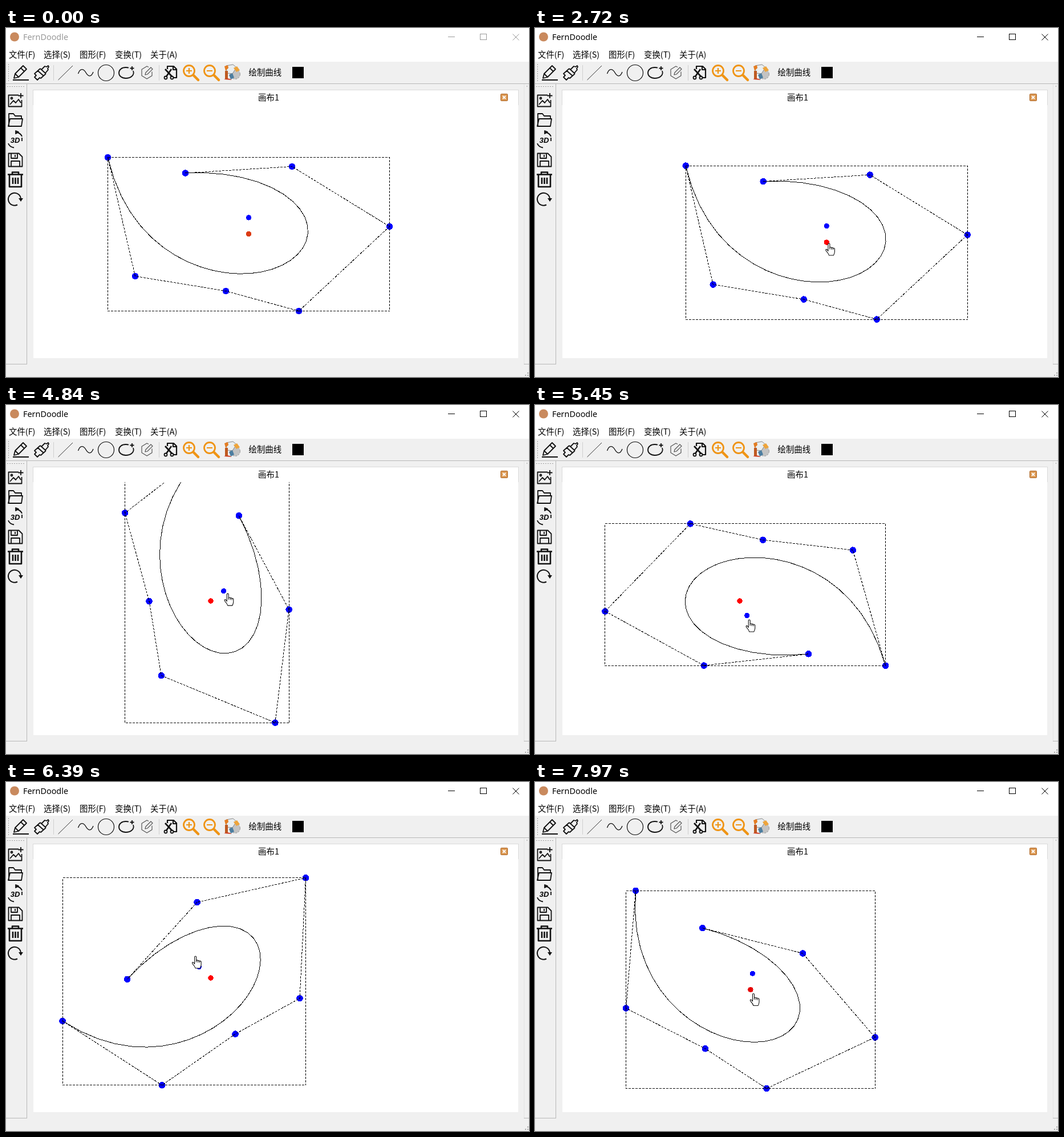
Recreate the animation shown at these times as an HTML page. Size 917 by 611 pixels, loop 8 s.

```html
<!DOCTYPE html>
<html lang="zh">
<head>
<meta charset="utf-8">
<title>FernDoodle</title>
<style>
html, body { margin: 0; width: 100%; height: 100%; overflow: hidden; background: #f0f0f0; }
svg { display: block; width: 917px; height: 611px; }
text { font: 14.4px "Noto Sans CJK SC", "Noto Sans CJK", "Noto Sans", sans-serif; }
.ico { fill: none; stroke: #111; stroke-width: 1.8; stroke-linejoin: round; }
.crisp { shape-rendering: crispEdges; }
.dash { fill: none; stroke: #000; stroke-dasharray: 4 2; }
</style>
</head>
<body>
<svg viewBox="0 0 917 611">
  <defs><clipPath id="page"><rect x="48" y="135" width="850" height="443"/></clipPath></defs>

  <!-- window frame -->
  <rect width="917" height="611" fill="#f0f0f0"/>
  <rect width="917" height="59" fill="#fff"/>
  <circle cx="15" cy="15.5" r="8" fill="#c98a5e"/>
  <text id="title" x="30" y="21" style="font-family:'Noto Sans',sans-serif">FernDoodle</text>
  <g id="buttons" class="crisp" fill="none">
    <path d="M775 15.5h12M831.5 10.5h11v10h-11z"/>
    <path d="M888.5 10.5l11 11M899.5 10.5l-11 11" shape-rendering="auto"/>
  </g>
  <g id="menu">
    <text x="5" y="52">文件(F)</text><text x="66" y="52">选择(S)</text><text x="129" y="52">图形(F)</text>
    <text x="191" y="52">变换(T)</text><text x="253" y="52">关于(A)</text>
  </g>
  <g class="crisp" fill="none" stroke="#b8b8b8">
    <path d="M0 97.5H917M36.5 98V588M0 588.5H37M908 588.5H917"/>
    <path d="M908.5 98V588" stroke="#e4e4e4"/>
    <path d="M83.5 65V92M268.5 65V92" stroke="#cfcfcf"/>
    <path d="M4.5 63V94M2 102.5H34M913.5 101V104" stroke="#a0a0a0" stroke-dasharray="2 2"/>
    <path d="M914 603.5h2M910 607.5h2M914 607.5h2" stroke="#a8a8a8" stroke-width="2"/>
  </g>

  <!-- top tools -->
  <g class="ico">
    <path d="M12 91H40M14 88l2-8L30 66l6 6L22 86zM26 70l6 6M16 80l6 6"/>
    <path d="M60 71l10 9M62 73l6-6 3 1 3-2 1 2-2 3 1 2-5 6M60 71l-10 9 3 3-3 3 5 5 4-4 2 1 9-8M56 75l10 9"/>
    <path d="M91.5 91L117 66" stroke="#333" stroke-width="1"/>
    <path d="M126.5 80C130 70 136 71 140 78S149 87 153 77" stroke-width="1.4"/>
    <circle cx="175.5" cy="78.5" r="14" stroke-width="1.2"/>
    <path d="M223 75C226 83 218 88 210 88 203 88 198 84 198 78.5 198 73 203 69 210 69q3 0 5 .7M221 67v7M217.5 70.5h7"/>
    <path d="M250 68.5l-3-1.5-9 5.500v11l9 5.500 9-5.500v-7M244 82l1-4 9-9 3 3-9 9z" stroke="#555" stroke-width="1.2"/>
    <path d="M283 72v-5h11l5 5v15h-6M293 67v6h6" stroke-width="2.2"/>
    <path d="M279 72l12 13M290 72l-9 13" stroke-width="2.6"/>
    <circle cx="280" cy="87" r="2.5"/><circle cx="291" cy="87" r="2.5"/>
  </g>
  <g fill="none" stroke="#ef9415" stroke-width="2.8">
    <circle cx="321" cy="75" r="9.5"/><circle cx="357" cy="75" r="9.5"/>
    <path d="M316 75h10M321 70v10M352 75h10" stroke-width="2.2"/>
    <path d="M329 83l8 8M365 83l8 8" stroke-width="4.5" stroke-linecap="round"/>
  </g>
  <g>
    <circle cx="402" cy="81" r="8.5" fill="#c3c3c3" stroke="#999" stroke-dasharray="3 2"/>
    <path d="M386 66l12-2 6 5-7 11-10-1z" fill="#e9eef0" stroke="#888"/>
    <path d="M383 67l6-2 1 5-5 5z" fill="#e47d22"/>
    <path d="M384 75h5v14h-5z" fill="#bf5a22"/>
    <path d="M382 90q8-4 14 1z" fill="#cf3e22"/>
    <path d="M399 70l6-3 5 7-6 3z" fill="#eda43b"/>
    <path d="M391 82l6-3 3 8-6 3z" fill="#4d7ea0"/>
  </g>
  <text x="425.5" y="83">绘制曲线</text>
  <rect x="502" y="68" width="20" height="20"/>

  <!-- side tools -->
  <g class="ico">
    <path d="M22 117.5H4.5v20h23V126M26 114v9M21.5 118.5h9M7 134l6-7 4 4 5-6 4 6"/><circle cx="10" cy="123" r="1.5"/>
    <path d="M5 171V150h8l3 4h11v4M4 172l3-13h22l-2 13z"/>
    <path d="M4 202q2 6 10 7.500M28 190q-2-6-10-7.500M17 180v5l5-3zM28 192v6"/>
    <path d="M4.5 219.500h18l6 6v17h-24zM9 220v8h11v-8M9 242v-9h15v9M16 222v4"/>
    <path d="M3 256.500h27M11 256v-3.500h11v3.500M6 257v21h21v-21M12 262v11M16.500 262v11M21 262v11" stroke-width="2.600"/>
    <path d="M20 309.500A11 11 0 1 1 26 299" stroke-width="2"/>
    <path d="M22 298h8l-4 6z" fill="#111" stroke="none"/>
  </g>
  <text x="16" y="201" text-anchor="middle" style="font:italic bold 13px 'Liberation Sans',sans-serif">3D</text>

  <!-- document -->
  <rect x="48" y="109" width="850" height="469" fill="#fff"/>
  <path class="crisp" d="M47.5 135V108.5H898.5V135" fill="none" stroke="#dadada"/>
  <text x="460.5" y="127" text-anchor="middle">画布1</text>
  <rect x="867.5" y="115.5" width="12" height="12" rx="1" fill="#dc9a55" stroke="#ac6424"/>
  <path d="M871 119l5 5M876 119l-5 5" stroke="#fff" stroke-width="1.8"/>

  <g clip-path="url(#page)" class="crisp">
    <g id="dots" fill="#00f"></g>
    <path id="box" class="dash"/><path id="hull" class="dash"/>
    <path id="curve" fill="none" stroke="#000"/>
    <circle id="pivot" r="4.7"/>
    <circle id="knob" r="4.7" fill="#00f"/>
  </g>

  <!-- pointers, tip at 0,0 -->
  <path id="arrow" d="M.5.5V16.5l3.7-3.5 2.8 6.5 2.5-1.1-2.8-6.2h5z" fill="#fff" stroke="#000"/>
  <g id="hand" fill="#fff" stroke="#111" stroke-width="1.1" stroke-linejoin="round">
    <path d="M-1.5 14V2Q-1.5.5 0 .5T1.5 2V8Q3 6.5 4.5 8.3 6 7.3 7.3 9 9 8.3 10 10V15.5Q9.5 19 8 21.5H0Q-1 18-4.500 14.5-6.5 12-5 11-3.5 10.5-1.5 14z"/>
    <path d="M1.5 8v3M4.5 8.500v3M7.3 9.300v2.500" fill="none"/>
  </g>
</svg>
<script>
const LOOP = 8000, STEP = 78, PHASE = 68;
const $ = id => document.getElementById(id);

// control points at rest, turned about the hub
const shape = [[112, 209], [160, 417], [319, 443], [447, 478], [606, 330], [435, 225], [248, 236.5]];
const hub = [359, 343], arm = 28.5;

// keys: time, then values
const turn = [   // shape angle, knob angle
  [4436, 0, 0], [4826, 65.4, 52.7], [5450, 177.2, 153.4], [6386, 315.8, 313], [6790, 377.7, 367]
];
const grip = [   // pointer from knob while turning
  [4436, 9, 2], [5450, 4, 7], [6386, -6, -19], [6790, 5.5, -22]
];
const slide = [  // dragging the whole drawing
  [2090, 66.5, 17.5], [2890, 163.5, 34], [2974, 163.5, 34], [3422, 0, 0], [7510, 0, 0], [7946, 6.5, 44.5]
];
const hover = [  // pointer relative to the drawing
  [850, 651, 558], [1550, 363.5, 347], [1820, 363.5, 343.5], [3422, 363, 345], [3830, 368, 316],
  [6800, 368, 292], [7430, 368, 340], [7946, 376.5, 325.5]
];

const linear = u => u;
const smooth = u => u * u * (3 - 2 * u);
const add = (...vs) => [0, 1].map(k => vs.reduce((sum, v) => sum + v[k], 0));

function track(keys, t, ease) {
  const i = keys.findIndex(k => k[0] > t);
  if (i <= 0) return keys.at(i).slice(1);
  const a = keys[i - 1], b = keys[i], u = ease((t - a[0]) / (b[0] - a[0]));
  return a.slice(1).map((v, j) => v + (b[j + 1] - v) * u);
}

// rounding at every small turn shrinks the shape and makes it wander
function turned(angle) {
  const w = angle * Math.PI / 180, c = Math.cos(w), s = Math.sin(w);
  const scale = 1 - .005 * w;
  const drift = [-3.2 * (s - 1 + c), -3.2 * (s + 1 - c)];
  return shape.map(([px, py]) => {
    const x = (px - hub[0]) * scale, y = (py - hub[1]) * scale;
    return add(hub, drift, [x * c - y * s, x * s + y * c]);
  });
}

function bezier(pts, u) {
  while (pts.length > 1)
    pts = pts.slice(1).map((q, i) => q.map((v, k) => pts[i][k] * (1 - u) + v * u));
  return pts[0];
}

const pathOf = pts => 'M' + pts.map(p => p.map(v => v.toFixed(2)).join(' ')).join('L');
const place = (el, [x, y]) => el.setAttribute('transform', `translate(${x.toFixed(2)} ${y.toFixed(2)})`);
const show = (el, on) => el.setAttribute('visibility', on ? 'visible' : 'hidden');

shape.forEach(() => {
  const dot = document.createElementNS('http://www.w3.org/2000/svg', 'circle');
  dot.setAttribute('r', 5.8);
  $('dots').append(dot);
});

function draw(time) {
  const t = Math.floor((time - PHASE) / STEP) * STEP + PHASE;
  const active = time >= 2030, late = time >= 7580;
  const [angle, knobAngle] = track(turn, t, linear);
  const shift = track(slide, t, smooth);
  const pts = turned(angle).map(q => add(q, shift));

  const xs = pts.map(q => q[0]), ys = pts.map(q => q[1]);
  const edge = v => Math.floor(v) + .5;
  const l = edge(Math.min(...xs)), r = edge(Math.max(...xs));
  const top = edge(Math.min(...ys)), low = edge(Math.max(...ys));
  $('box').setAttribute('d', `M${l} ${top}H${r}V${low}H${l}Z`);
  $('hull').setAttribute('d', pathOf(pts));
  $('curve').setAttribute('d', pathOf(Array.from({ length: 33 }, (_, k) => bezier(pts, k / 32))));
  pts.forEach((q, k) => place($('dots').children[k], q));

  // a new drag puts the pivot back in the middle of the box
  const mid = late ? [(l + r) / 2, (top + low) / 2] : add(hub, shift);
  const w = knobAngle * Math.PI / 180;
  const knob = add(mid, [arm * Math.sin(w), -arm * Math.cos(w)]);
  place($('pivot'), mid);
  place($('knob'), knob);

  $('pivot').setAttribute('fill', late ? '#e60000' : active ? '#f00' : '#dc3c14');
  $('title').setAttribute('fill', active ? '#000' : '#999');
  $('buttons').setAttribute('stroke', active ? '#000' : '#999');
  $('menu').setAttribute('fill', time >= 220 && time < 2170 ? '#a0a0a0' : '#000');

  const turning = time >= 4210 && time < 6850;
  const tip = turning ? add(knob, track(grip, t, linear)) : add(track(hover, t, smooth), shift);
  show($('arrow'), time >= 850 && !active);
  show($('hand'), active);
  place($('arrow'), tip);
  place($('hand'), tip);
}

const start = performance.now();
function frame() {
  draw((performance.now() - start) % LOOP);
  requestAnimationFrame(frame);
}
frame();
</script>
</body>
</html>
```
